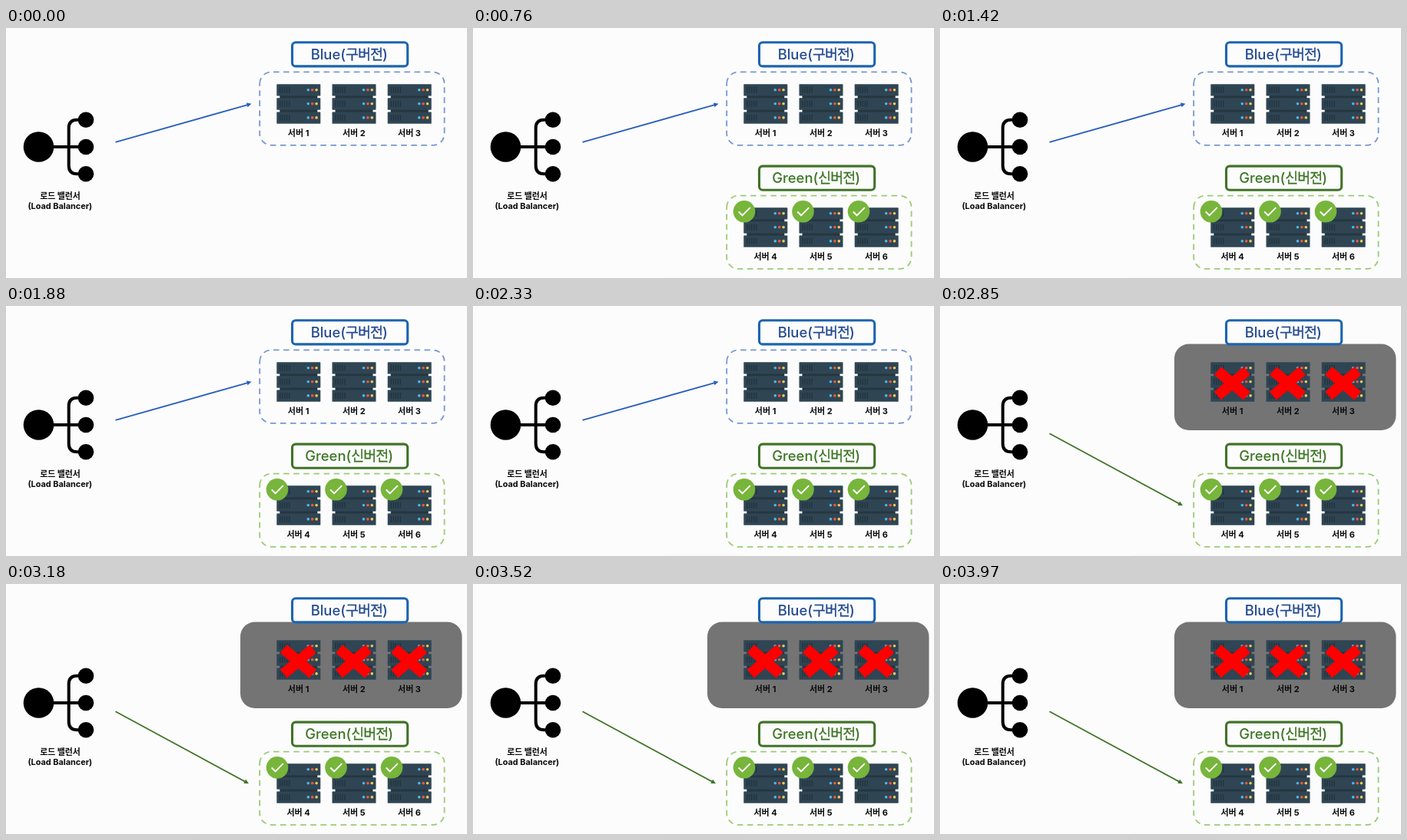
An HTML page that plays this animation: 600 px wide and 326 px high, repeating every 4000 ms.

```html
<!DOCTYPE html>
<html lang="ko">
<head>
<meta charset="utf-8">
<title>Blue-green deployment</title>
<style>
  html, body { margin: 0; width: 100%; height: 100%; overflow: hidden; background: #fcfcfc; }
  svg { display: block; width: 600px; height: 326px; }
  text { font-family: Inter, "Noto Sans CJK KR", "Noto Sans CJK JP", sans-serif; text-anchor: middle; }
  .label { font-size: 11px; font-weight: 700; fill: #0b0b0b; }
  .lb { font-size: 10.9px; }
  .title { font-size: 18.4px; font-weight: 500; }
  .title tspan { letter-spacing: -.05em; stroke-width: .3; }
</style>
</head>
<body>
<svg viewBox="0 0 600 326">
  <defs>
    <g id="unit">
      <rect width="57" height="15.4" rx=".6" fill="#2f4553"/>
      <path d="M4.5 3.5v8M7.5 3.5v8M10.5 3.5v8M13.5 3.5v8M16.5 3.5v8" stroke="#203039" stroke-width="1.1"/>
      <circle cx="41" cy="7.5" r="1.8" fill="#4db8ea"/>
      <circle cx="46.4" cy="7.5" r="1.8" fill="#f05a3c"/>
      <circle cx="51.8" cy="7.5" r="1.8" fill="#f6cc55"/>
    </g>
    <g id="server">
      <rect x="4" y="12" width="49" height="28" fill="#25363f"/>
      <use href="#unit"/>
      <use href="#unit" y="18.1"/>
      <use href="#unit" y="36.2"/>
    </g>
    <g id="check">
      <circle r="14.3" fill="#77b53b"/>
      <path d="M-7.3 .2L-2.4 5L7.8 -5.2" fill="none" stroke="#fff" stroke-width="1.9"/>
    </g>
    <path id="cross" d="M-19 -16.3L19 16.3M-19 16.3L19 -16.3" stroke="#fe0000" stroke-width="14"/>
  </defs>

  <rect x="250" y="324.5" width="100" height="1.5" fill="#f9f9f9"/>

  <path d="M42 155H104M104 119.7H92.5Q81.7 119.7 81.7 130.5V179.5Q81.7 190.3 92.5 190.3H104"
    fill="none" stroke="#000" stroke-width="4"/>
  <circle cx="42.5" cy="155" r="19.8"/>
  <circle cx="104" cy="119.7" r="10.3"/>
  <circle cx="104" cy="155" r="10.3"/>
  <circle cx="104" cy="190.3" r="10.3"/>
  <text class="label lb" x="70.5" y="222.5">로드 밸런서</text>
  <text class="label lb" x="70.3" y="236">(Load Balancer)</text>

  <g id="before"></g>
  <g id="after">
    <rect x="305" y="49.5" width="288.5" height="112.5" rx="19" fill="#747474"/>
  </g>
  <g id="blue"></g>
  <g id="green"></g>
  <g id="crosses"></g>
</svg>
<script>
const LOOP = 4000, GREEN_AT = 760, SWITCH_AT = 2850;
const columns = [352.3, 424.5, 496.7];
const $ = id => document.getElementById(id);
const add = (id, markup) => $(id).insertAdjacentHTML('beforeend', markup);

// The outline begins on the left edge, so the dashes run clockwise from there.
const dashes = (y, color) =>
  `<path d="M330.2 ${y + 15}a15 15 0 0 1 15 -15h210.4a15 15 0 0 1 15 15v65.4
    a15 15 0 0 1 -15 15h-210.4a15 15 0 0 1 -15 -15z" fill="none"
    stroke="${color}" stroke-width="1.8" stroke-dasharray="7.6 5.5"/>`;

const title = (y, name, version, line, ink) =>
  `<rect x="372.5" y="${y}" width="150.2" height="31.2" rx="4.5" fill="#fcfcfc" stroke="${line}" stroke-width="3.1"/>
   <text class="title" x="446.7" y="${y + 22.1}" fill="${ink}">${name}(<tspan stroke="${ink}">${version}</tspan>)</text>`;

const servers = (y, first) => columns.map((x, i) =>
  `<use href="#server" x="${x}" y="${y}"/>
   <text class="label" x="${x + 28.3}" y="${y + 67.6}">서버 ${first + i}</text>`).join('');

function arrow(x1, y1, x2, y2, color) {
  const angle = Math.atan2(y2 - y1, x2 - x1) * 180 / Math.PI;
  const length = Math.hypot(x2 - x1, y2 - y1);
  return `<g transform="translate(${x1} ${y1}) rotate(${angle})">
    <path d="M0 0H${length - 4}" stroke="${color}" stroke-width="1.8"/>
    <path d="M${length} 0l-6 -3v6z" fill="${color}"/></g>`;
}

add('before', dashes(57.4, '#7697d2') + arrow(142.5, 148.8, 319.5, 98.8, '#2a5fbd'));
add('after', arrow(142.5, 166.3, 316, 260.3, '#3f7327'));
add('blue', title(18.7, 'Blue', '구버전', '#1c64b0', '#234a90') + servers(73.2, 1));
add('green', dashes(218.7, '#9bcb77') + title(180.1, 'Green', '신버전', '#417328', '#3d7625') +
  servers(234.2, 4) +
  [353, 429.5, 502].map(x => `<use href="#check" x="${x}" y="239.3"/>`).join(''));
add('crosses', columns.map(x => `<use href="#cross" x="${x + 28}" y="100.8"/>`).join(''));

const show = (id, on) => $(id).setAttribute('visibility', on ? 'visible' : 'hidden');
const start = performance.now();

function draw() {
  const t = (performance.now() - start) % LOOP;
  const switched = t >= SWITCH_AT;
  show('green', t >= GREEN_AT);
  show('before', !switched);
  show('after', switched);
  show('crosses', switched);
  requestAnimationFrame(draw);
}
draw();
</script>
</body>
</html>
```
